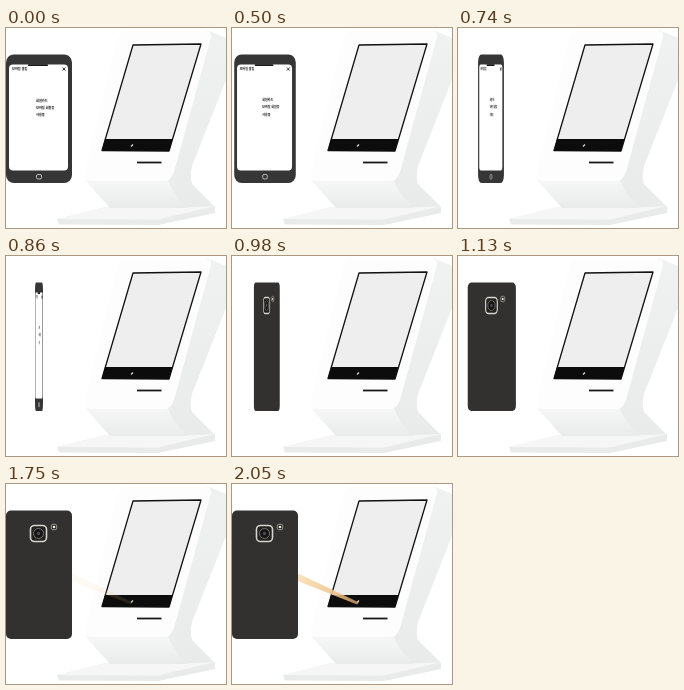
Animation of 220 by 200 pixels, one loop 2950 ms. Source, as an HTML page:

```html
<!DOCTYPE html>
<html lang="ko">
<head>
<meta charset="utf-8">
<title>Mobile pass</title>
<style>
html, body { margin: 0; width: 100%; height: 100%; overflow: hidden; background: #fff; }
svg { display: block; width: 220px; height: 200px; }
text { font-family: "Noto Sans CJK KR", "Noto Sans CJK", sans-serif; font-weight: 900; font-size: 3.2px; fill: #111; }
</style>
</head>
<body>
<svg viewBox="0 0 220 200">
  <defs>
    <linearGradient id="side" x1="0" y1="0" x2="0" y2="1">
      <stop offset="0" stop-color="#f0f1f1"/>
      <stop offset="1" stop-color="#e9ebeb"/>
    </linearGradient>
    <linearGradient id="neck" x1="0" y1="0" x2="0" y2="1">
      <stop offset="0" stop-color="#f7f7f7"/>
      <stop offset="1" stop-color="#e9eaea"/>
    </linearGradient>
    <linearGradient id="glow" gradientUnits="userSpaceOnUse" x1="65" y1="91" x2="127" y2="119">
      <stop offset="0" stop-color="#f9dfb5" stop-opacity=".85"/>
      <stop offset=".6" stop-color="#eec58b" stop-opacity=".9"/>
      <stop offset="1" stop-color="#d9a765" stop-opacity=".75"/>
    </linearGradient>
  </defs>

  <g id="stand">
    <path d="M51 191 L100 179 L209 178 V185 L152 197 L53 196.500Z" fill="#e9eaea"/>
    <path d="M51 191 L100 179 L209 178 L152 191.500Z" fill="#f6f6f6"/>
    <path d="M201 2 L220 10 V52 L190 128 Q182 144 186 156 L208 178 L172 180 L152 156Z" fill="url(#side)"/>
    <path d="M79 152 H162 Q166 166 182 180 H104Z" fill="url(#neck)"/>
    <path d="M119 3 H200 Q206 3 205 9 L168 144 Q165 153 158 153 H86 Q77 153 79 143 L112 9 Q114 3 119 3Z" fill="#fdfdfd"/>
    <path d="M127 17 L195 16 L163 123 L96 122.500Z" fill="#eee" stroke="#111" stroke-width="1.300" stroke-linejoin="round"/>
    <path d="M99 111 H166.500 L163 123 L96 122.500Z" fill="#0c0c0c"/>
    <path d="M125 118.500 L127 116.500" stroke="#ddd" stroke-width="1.200"/>
    <path d="M131 134.500 H155.500" stroke="#181818" stroke-width="1.800"/>
  </g>

  <path id="beam" d="M62 87.500 L127 118.500 L125 120.500 L62 95.500Z" fill="url(#glow)"/>

  <g id="phone">
    <rect id="body" y="26.500" height="128.500"/>
    <g id="front">
      <rect x="-30" y="36.500" width="59" height="106" rx="4" fill="#fff"/>
      <rect x="-11" y="36.300" width="20" height="1.800" rx=".9" fill="#181818"/>
      <rect x="-2.500" y="146.500" width="5" height="4.500" rx="1.500" fill="none" stroke="#ddd" stroke-width=".8"/>
      <text x="-27" y="42.300">모바일 출입</text>
      <path d="M23.500 39.500 l3 3 m0 -3 l-3 3" stroke="#222" stroke-width=".9"/>
      <text x="-3" y="73.500">회원카드</text>
      <text x="-3" y="80.500">모바일 회원증</text>
      <text x="-3" y="88">사용중</text>
    </g>
    <g id="back">
      <rect x="-8.500" y="41.500" width="16" height="16" rx="4" fill="#24221f" stroke="#d7d5d0" stroke-width="1.600"/>
      <circle cx="-.5" cy="49.500" r="5" fill="#151515" stroke="#77736e" stroke-width="1"/>
      <circle cx="-.5" cy="49.500" r="1.700" fill="#4a4a50"/>
      <rect x="12.300" y="40.300" width="5.400" height="5.400" rx="1.500" fill="#2b2927" stroke="#aaa59b" stroke-width=".9"/>
      <circle cx="15" cy="43" r="1.300" fill="#f3eede"/>
    </g>
  </g>
</svg>
<script>
const LOOP = 2950, WIDTH = 66, THICK = 8, CENTER = 33;
const [body, front, back, beam] = ['body', 'front', 'back', 'beam'].map(id => document.getElementById(id));

// Share of a stepped change that has happened at time t.
const progress = (t, start, gap, count) =>
  Math.max(0, Math.min(count, Math.floor((t - start) / gap) + 1)) / count;

function drawPhone(turn) {
  const isBack = turn > 0.5;
  const w = THICK + (WIDTH - THICK) * Math.abs(1 - 2 * turn);
  const scale = w / WIDTH;
  const center = CENTER + (isBack ? 3 * (1 - scale) : 0);
  body.setAttribute('x', center - w / 2);
  body.setAttribute('width', w);
  body.setAttribute('rx', (isBack ? 5 : 8) * scale);
  body.setAttribute('ry', isBack ? 5 : 8);
  body.setAttribute('fill', isBack ? '#333130' : '#363637');
  for (const [face, shown] of [[front, !isBack], [back, isBack]]) {
    face.style.display = shown ? '' : 'none';
    face.setAttribute('transform', `translate(${center} 0) scale(${scale} 1)`);
  }
}

function render(t) {
  drawPhone(progress(t, 500, 30, 26));
  beam.style.opacity = progress(t, 1750, 60, 6);
}

const start = performance.now();
function tick() {
  render((performance.now() - start) % LOOP);
  requestAnimationFrame(tick);
}
tick();
</script>
</body>
</html>
```
